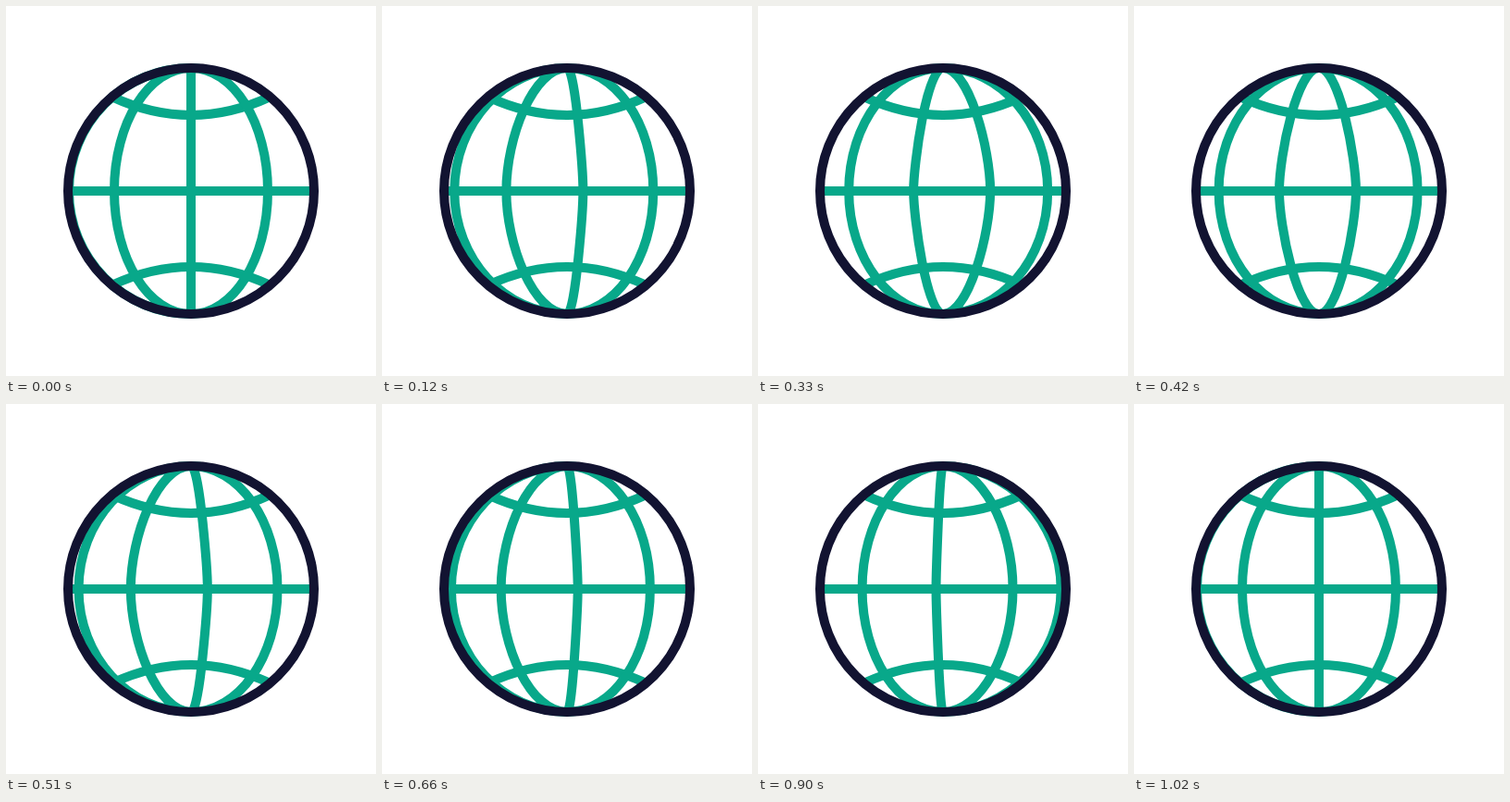
An HTML page for the animation above (1.11 s loop, 400 by 400 pixels).

```html
<!DOCTYPE html>
<html lang="en">
<head>
<meta charset="utf-8">
<title>Spinning globe</title>
<style>
  html, body { margin: 0; width: 100%; height: 100%; overflow: hidden; background: #fff; }
  svg { display: block; width: 100%; height: 100%; }
  path, circle { fill: none; stroke: #08a88a; stroke-width: 10; }
  circle { stroke: #121331; }
</style>
</head>
<body>
<svg viewBox="0 0 400 400">
  <path d="M70 200H330M115 98.4Q200 137.6 285 98.4M115 301.6Q200 262.4 285 301.6"/>
  <path id="meridians"/>
  <circle cx="200" cy="200" r="133"/>
</svg>
<script>
const LOOP = 1110, SPIN = 1020, STEP = 30, TURNS = 7;
const C = 200, R = 133, KAPPA = 0.5523;
const STOPS = [-132, -83, 0, 83, 132];
const meridians = document.getElementById('meridians');

const bezier = (a, b, s) => 3 * a * s * (1 - s) ** 2 + 3 * b * s * s * (1 - s) + s ** 3;

// cubic-bezier(.167, .167, .446, 1), solved by bisection
function ease(u) {
  let lo = 0, hi = 1;
  for (let i = 0; i < 30; i++) {
    const mid = (lo + hi) / 2;
    if (bezier(0.167, 0.446, mid) < u) lo = mid; else hi = mid;
  }
  return bezier(0.167, 1, (lo + hi) / 2);
}

// Half ellipse through both poles; its side handles shrink as it flattens to a line
function meridian(x) {
  const side = C + x, pole = C + KAPPA * x;
  const h = KAPPA * R * Math.min(1, Math.abs(x) / STOPS[3]);
  return `M${C} ${C - R}C${pole} ${C - R} ${side} ${C - h} ${side} ${C}` +
         `C${side} ${C + h} ${pole} ${C + R} ${C} ${C + R}`;
}

function draw(time) {
  const t = Math.min(SPIN, Math.floor((time % LOOP) / STEP) * STEP);
  const p = t < SPIN ? (TURNS * ease(t / SPIN)) % 1 : 0;
  meridians.setAttribute('d', STOPS.slice(0, -1)
    .map((x, i) => meridian(x + (STOPS[i + 1] - x) * p)).join(''));
}

const start = performance.now();
function tick() {
  draw(performance.now() - start);
  requestAnimationFrame(tick);
}
tick();
</script>
</body>
</html>
```
